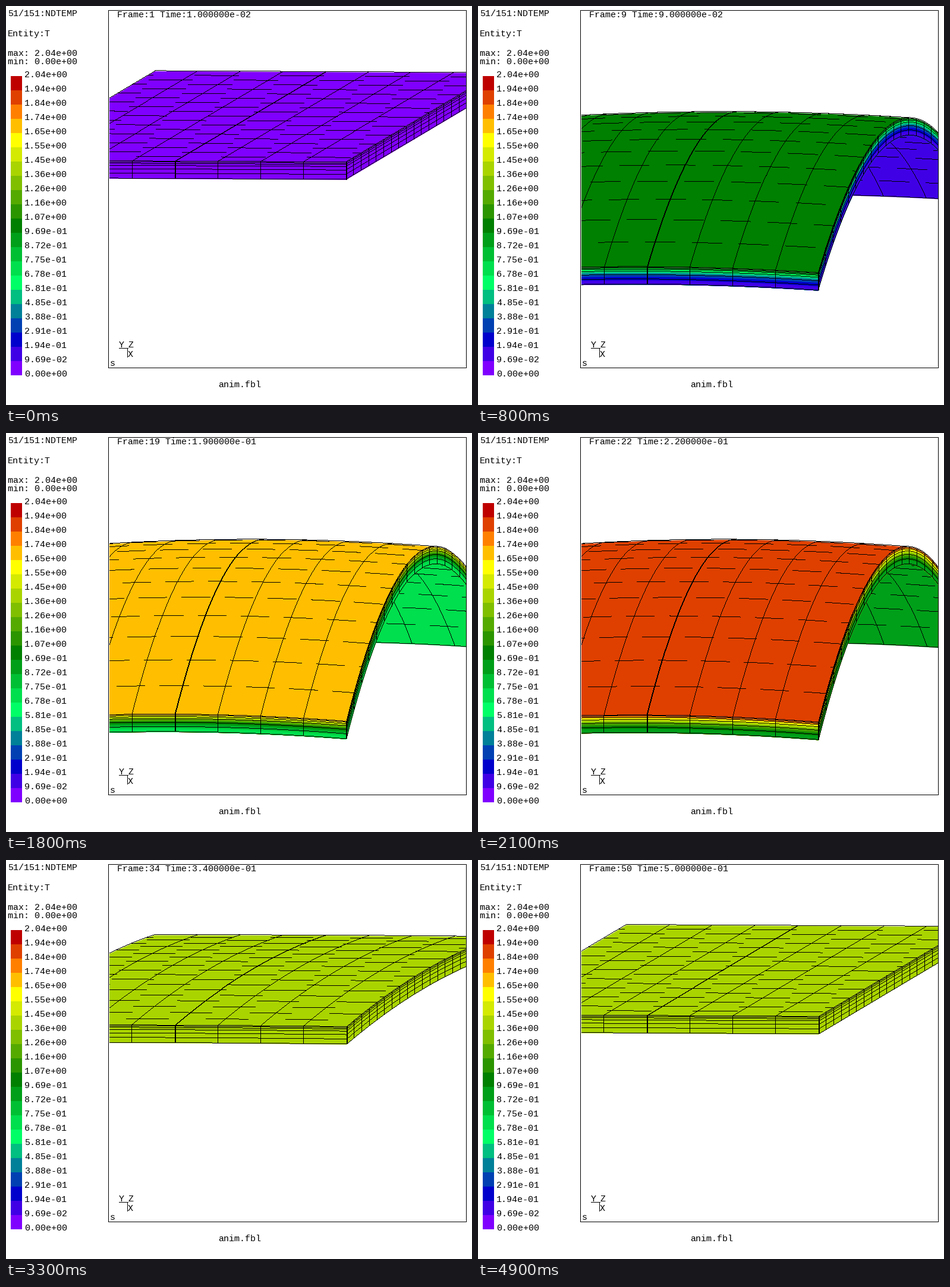
A matplotlib script that plays this animation: 784 px wide and 672 px high, repeating every 5000 ms.

```python
from itertools import groupby

import matplotlib.pyplot as plt
import numpy as np
from matplotlib.animation import FuncAnimation
from matplotlib.patches import Rectangle

W, H, DPI = 784, 672, 100
FRAMES, INTERVAL = 50, 100
PX = 72 / DPI

# Heat pulse: rates are per frame, temperatures in display units
T_MAX, BINS = 2.0352, 21
HEAT_ON, HEAT_OFF = 1.45, 23.5
HEAT_RATE, GRADIENT, DECAY = 0.0635, 1.0, 0.27
MAX_SAG = 214.5

NU, NV = 8, 20
LAYERS = [0, 0.06, 0.14, 0.26, 0.46, 0.71, 1]

plt.rcParams.update({"font.family": "Liberation Mono", "font.size": 15 * PX})

anchors = [0, 2, 4, 6, 10, 16, 18, 20]
channels = [
    [0.5, 0, 0, 0, 0, 1, 1, 0.75],
    [0, 0, 0.5, 1, 0.5, 1, 0.5, 0],
    [1, 0.8, 0.6, 0.4, 0, 0, 0, 0],
]
COLORS = np.transpose([np.interp(range(BINS), anchors, c) for c in channels])


def pulse(response, n):
    """Response to a heat source that is switched on, then off."""
    return np.mean([response(max(n - HEAT_ON + e, 0)) - response(max(n - HEAT_OFF + e, 0))
                    for e in (-0.5, 0, 0.5)])


def temperature(n, depth):
    modes = np.arange(1, 13)
    shape = 4 / (np.pi * modes) ** 2 * np.cos(modes * np.pi * depth)

    def response(s):
        return HEAT_RATE * s + GRADIENT * np.sum(shape * (1 - np.exp(-DECAY * modes ** 2 * s)))

    return pulse(response, n)


def color_bin(t):
    return int(np.clip(t / T_MAX * BINS, 0, BINS - 1))


def draw_pixels(x, y):
    view.plot(x - 0.5, y - 0.5, ",", color="k", zorder=1)


def draw_line(x, y, bold=False):
    """Unsmoothed line with one pixel per step along its longer direction."""
    steps = np.maximum(abs(np.diff(x)), abs(np.diff(y)))
    length = np.r_[0, np.cumsum(steps)]
    at = np.linspace(0, length[-1], int(length[-1]) + 2)
    px, py = np.interp(at, length, x), np.interp(at, length, y)
    draw_pixels(px, py)
    if bold:
        draw_pixels(px + 1, py)


def draw_area(x, y, b):
    view.fill(x, y, color=COLORS[b], lw=0, zorder=1)


class Plate:
    """Plate bent by heat; u runs along the front, v to the back."""

    def __init__(self, n):
        self.n = n
        self.bend = pulse(lambda s: 1 - np.exp(-DECAY * s), n)
        self.sag = MAX_SAG * self.bend
        self.scale = 1 + 0.0045 * pulse(lambda s: HEAT_RATE * s, n)
        self.crest = min(1, 0.5 + 150.8 / (8 * max(self.sag, 1e-6)))

    def point(self, u, v, depth):
        u, v, depth = np.broadcast_arrays(*(np.asarray(a, float) for a in (u, v, depth)))
        x = -2.4 + 574.4 * u + 253.4 * v
        y = 260.7 + 3 * u - 150.8 * v + 29.3 * depth
        x = 411.6 + (x - 411.6) * self.scale
        y = 200 + (y - 200) * self.scale
        return x, y + self.sag * ((2 * v - 1) ** 2 + 0.049 * (2 * u - 1) ** 2)

    def line(self, u, v, depth, bold=False):
        draw_line(*self.point(u, v, depth), bold)

    def dashed_row(self, j, depth):
        u = np.linspace(0, 1, 600)
        phase = NU * u * (0.5 + 0.5 * self.bend) + 0.55 * j
        shown = phase % 1 < 0.52 + 0.15 * self.bend
        draw_pixels(*self.point(u[shown], j / NV, depth))

    def surface(self, v0, v1, depth):
        s = np.linspace(0, 1, 80)
        v = v0 + (v1 - v0) * s
        u_path = np.concatenate([s, s * 0 + 1, s[::-1], s * 0])
        v_path = np.concatenate([s * 0 + v0, v, s * 0 + v1, v[::-1]])
        draw_area(*self.point(u_path, v_path, depth), color_bin(temperature(self.n, depth)))
        for i in range(NU + 1):
            self.line(i / NU, v, depth, bold=i == NU // 2 and depth == 0)
        for j in range(NV + 1):
            if v0 <= j / NV <= v1:
                self.dashed_row(j, depth)
        for edge in (v0, v1):
            self.line(s, edge, depth)

    def wall(self, u, v, posts):
        """Cut face along a (u, v) path, with colour bands through the depth."""
        cuts = np.linspace(0, 1, 61)
        bins = [color_bin(temperature(self.n, d)) for d in (cuts[1:] + cuts[:-1]) / 2]
        xb, yb = self.point(u, v, 1)
        for b, run in groupby(range(60), key=lambda k: bins[k]):
            xa, ya = self.point(u, v, cuts[next(run)])
            draw_area(np.r_[xa, xb[::-1]], np.r_[ya, yb[::-1]], b)
        for depth in LAYERS:
            self.line(u, v, depth)
        for pu, pv in posts:
            self.line(pu, pv, [0, 1], bold=pv == 0 and pu in (0.5, 1))

    def draw(self):
        s = np.linspace(0, 1, 160)
        if self.crest < 1:
            self.surface(self.crest, 1, 1)
        self.surface(0, self.crest, 0)
        self.wall(s * 0 + 1, s, [(1, j / NV) for j in range(NV + 1)])
        self.wall(s, s * 0, [(i / NU, 0) for i in range(NU + 1)])


def pixel_axes(left, top, width, height):
    ax = fig.add_axes([left / W, 1 - (top + height) / H, width / W, height / H])
    ax.set(xlim=(left, left + width), ylim=(top + height, top), autoscale_on=False)
    ax.axis("off")
    return ax


def label(x, baseline, text):
    return stage.text(x, baseline, text, va="baseline", ha="left", color="k")


def draw_static():
    label(3, 17, "51/151:NDTEMP")
    label(3, 51, "Entity:T")
    label(3, 84, f"max: {T_MAX:.2e}")
    label(3, 98, f"min: {0:.2e}")
    for k in range(BINS + 1):
        label(31, 624 - 24 * k, f"{T_MAX * k / BINS:.2e}")
    for k, color in enumerate(COLORS):
        stage.add_patch(Rectangle((8, 598 - 24 * k), 19, 24, color=color, lw=0,
                                  antialiased=False))
    label(357, 642, "anim.fbl")
    label(175, 606, "s")
    label(190, 575, "Y")
    label(206, 575, "Z")
    label(205, 591, "X")
    for xs, ys in (([190, 205], [576, 576]), ([204, 204], [576, 591]),
                   ([172.5, 774.5, 774.5, 172.5, 172.5], [7, 7, 609, 609, 7])):
        stage.plot(xs, ys, color="k", lw=PX, antialiased=False)


def update(n):
    for artist in list(view.lines) + list(view.patches):
        artist.remove()
    Plate(n).draw()
    title.set_text(f"Frame:{n + 1} Time:{(n + 1) / 100:.6e}")
    return []


fig = plt.figure(figsize=(W / DPI, H / DPI), dpi=DPI, facecolor="white")
view = pixel_axes(174, 8, 600, 600)
stage = pixel_axes(0, 0, W, H)
draw_static()
title = label(187, 19, "")

animation = FuncAnimation(fig, update, frames=FRAMES, interval=INTERVAL,
                          init_func=lambda: update(0), repeat=True,
                          repeat_delay=0, blit=False)
plt.show()
```
